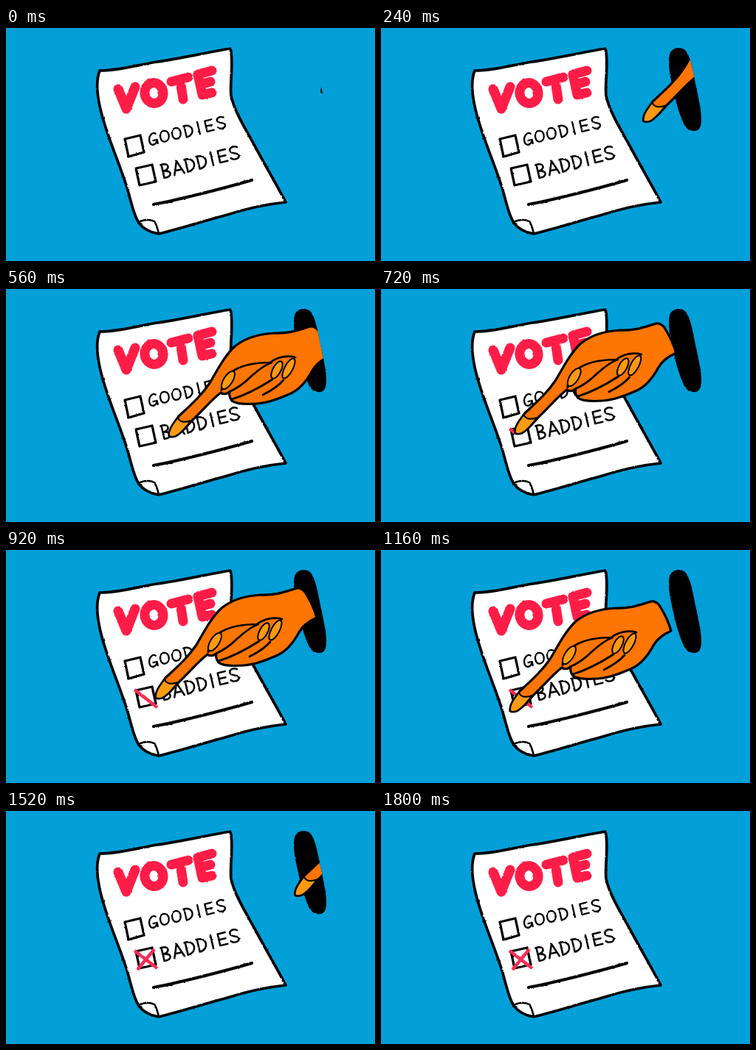
Recreate the animation shown at these times as an HTML page. Size 500 by 317 pixels, loop 1840 ms.

```html
<!DOCTYPE html>
<html lang="en">
<head>
<meta charset="utf-8">
<title>Vote</title>
<style>
  html, body { margin: 0; width: 100%; height: 100%; overflow: hidden; background: #029fd9; }
  svg { display: block; width: 100vw; height: 100vh; }
  .line { fill: none; stroke: #000; stroke-linecap: round; stroke-linejoin: round; }
  .title { fill: none; stroke: #ff1d47; stroke-width: 13; stroke-linecap: round; stroke-linejoin: round; }
  .letters { stroke-width: 2.2; }
  .cross { fill: none; stroke: #f92c55; stroke-width: 4.4; }
  .skin { fill: #fd7503; stroke: #000; stroke-width: 3.2; stroke-linejoin: round; }
  .nail { fill: #fb9a14; stroke: #000; stroke-width: 2; stroke-linejoin: round; }
</style>
</head>
<body>
<svg viewBox="0 0 500 317" role="img" aria-label="Vote: goodies, baddies">
  <defs>
    <filter id="rough" filterUnits="userSpaceOnUse" x="0" y="0" width="500" height="317" color-interpolation-filters="sRGB">
      <feTurbulence type="fractalNoise" baseFrequency=".22" numOctaves="2" seed="4"/>
      <feDisplacementMap in="SourceGraphic" scale="2" xChannelSelector="R" yChannelSelector="G"/>
    </filter>
    <!-- everything left of the hole's far rim -->
    <clipPath id="rim">
      <path d="M0 0H408V27C420 34 423 62 428 84C431 100 435 120 433 135V317H0Z"/>
    </clipPath>
    <path id="G" d="M5 -6C1 -10 -5 -4 -5 2C-5 9 3 9 5 2L0 2M5 2L5 7"/>
    <path id="O" d="M0 -7C-7 -7 -8 7 -1 7C7 7 8 -7 0 -7Z"/>
    <path id="D" d="M-4 -7L-4 8C8 8 9 -8 -5 -7"/>
    <path id="I" d="M0 -8L0 8"/>
    <path id="E" d="M5 -7L-4 -7L-4 7L5 7M-4 0L4 0"/>
    <path id="S" d="M5 -6C1 -9 -5 -7 -4 -3C-3 1 5 0 5 4C4 9 -3 8 -5 5"/>
    <path id="B" d="M-4 -8L-4 8C7 9 6 0 -3 0C6 -1 5 -9 -5 -8"/>
    <path id="A" d="M-6 8L0 -8L6 8M-4 3L4 3"/>
  </defs>

  <g filter="url(#rough)">
    <path fill="#fff" stroke="#000" stroke-width="3.7" stroke-linejoin="round"
      d="M127 58C155 58 178 50 205 46C240 41 272 33 304 28C309 45 303 75 305 92C309 113 325 138 339 164C353 190 367 214 379 237C350 240 325 246 300 254C270 262 240 272 207 280C195 278 185 272 180 265C172 253 170 236 163 214C154 186 143 161 134 132C126 107 119 78 127 58Z"/>
    <path class="line" stroke-width="2.6" d="M182 263Q192 259 201 263Q205 270 207 280"/>
    <g class="title">
      <path d="M152 83L163 110L175 80"/>
      <ellipse cx="200.5" cy="88.5" rx="12.5" ry="14" transform="rotate(-12 200.5 88.5)"/>
      <path d="M224 73L247 67M236 71L240 97"/>
      <path d="M279 58L260 63L266 91L279 88M263 77L277 73"/>
    </g>
    <path class="line" stroke-width="3.3" d="M161 151L182 146L187 169L166 175ZM176 191L198 186L203 209L181 214Z"/>
    <path class="line" stroke-width="4.2" d="M200 240C232 234 292 219 333 207"/>
    <g class="line letters" id="words"></g>
  </g>

  <g filter="url(#rough)">
    <path class="cross"/>
    <path class="cross"/>
  </g>

  <g filter="url(#rough)">
    <path id="hole" d="M391 36C393 27 405 24 412 30C420 38 423 62 428 84C432 105 437 125 432 136C428 143 416 141 411 132C403 115 398 95 394 75C390 58 389 45 391 36Z"/>
  </g>

  <g clip-path="url(#rim)">
    <!-- drawn with the fingertip at 0,0 -->
    <g id="hand"><g transform="translate(-175 -219)">
      <path class="skin" d="M175 219C174 211 180 203 188 192C203 178 218 165 230 147C240 130 250 110 264 97C280 84 298 80 318 79C338 80 352 74 366 70Q372 69 377 75C384 86 390 99 393 110C382 115 374 121 369 130C362 143 353 155 340 161C326 167 310 174 294 175C280 176 266 176 260 171C257 167 256 163 257 159C252 163 247 162 245 160C232 170 220 185 207 197C199 206 192 215 184 219Q179 221 175 219Z"/>
      <path class="line" stroke-width="2.7" d="M246 157C246 145 254 135 264 129C280 120 298 119 312 119C322 111 336 109 346 112M256 159C268 154 278 146 286 138C296 129 305 122 314 119M260 169C276 164 298 153 315 142M302 163C314 157 324 150 330 143"/>
      <path class="nail" d="M175 219C174 211 180 203 187 194Q190 203 205 198C198 206 192 215 184 219Q179 221 175 219Z"/>
      <ellipse class="nail" rx="6" ry="14" transform="translate(255 143) rotate(32)"/>
      <ellipse class="nail" rx="5.5" ry="13" transform="translate(321 129) rotate(28)"/>
      <ellipse class="nail" rx="5.5" ry="15" transform="translate(337 127) rotate(28)"/>
    </g></g>
  </g>
</svg>
<script>
  const LOOP = 1840, STEP = 40;
  const words = document.getElementById('words');
  const hole = document.getElementById('hole');
  const hand = document.getElementById('hand');
  const crosses = document.querySelectorAll('.cross');

  function write(word, x, y, slope, size) {
    const half = c => c === 'I' ? 6 : 8;
    const x0 = x;
    for (const c of word) {
      if (x > x0) x += half(c);
      const use = document.createElementNS('http://www.w3.org/2000/svg', 'use');
      use.setAttribute('href', '#' + c);
      use.setAttribute('transform',
        `translate(${x} ${y + (x - x0) * slope}) rotate(-13) scale(${size})`);
      words.append(use);
      x += half(c);
    }
  }
  write('GOODIES', 199, 151, -0.24, 1.05);
  write('BADDIES', 217, 194, -0.26, 1.15);

  const strokes = [
    { begin: 680, end: 840, from: [174, 190], to: [205, 214] },
    { begin: 1000, end: 1120, from: [201, 188], to: [178, 216] }
  ];
  strokes.forEach((s, i) => crosses[i].setAttribute('d', `M${s.from}L${s.to}`));

  // the fingertip's journey: each leg runs from the last point to its own
  const entry = [428, 87];
  const legs = [
    { begin: 120, end: 560, to: [221, 200], power: 1.35 },
    ...strokes.flatMap((s, i) => [
      { begin: i ? strokes[i - 1].end : 560, end: s.begin, to: s.from },
      s
    ]),
    { begin: 1120, end: 1160, to: [175, 219] },
    { begin: 1160, end: 1600, to: [440, 91] }
  ];

  const clamp = v => Math.min(1, Math.max(0, v));
  const progress = (t, leg) => clamp((t - leg.begin) / (leg.end - leg.begin));

  function fingertip(t) {
    return legs.reduce((point, leg) => {
      const p = 1 - (1 - progress(t, leg)) ** (leg.power || 1);
      return point.map((v, i) => v + (leg.to[i] - v) * p);
    }, entry);
  }

  function draw(now) {
    const t = Math.floor((now % LOOP) / STEP) * STEP;
    hand.setAttribute('transform', `translate(${fingertip(t)})`);

    const open = Math.min(clamp(t / 120), clamp((1800 - t) / 160));
    hole.setAttribute('transform',
      `translate(430 115) scale(${open} ${Math.sqrt(open)}) translate(-430 -115)`);
    hole.style.display = open ? '' : 'none';

    strokes.forEach((s, i) => {
      const p = progress(t, s);
      crosses[i].style.display = p ? '' : 'none';
      crosses[i].style.strokeDasharray = `${p * crosses[i].getTotalLength()} 99`;
    });
  }

  const start = performance.now();
  function tick() {
    draw(performance.now() - start);
    requestAnimationFrame(tick);
  }
  tick();
</script>
</body>
</html>
```
